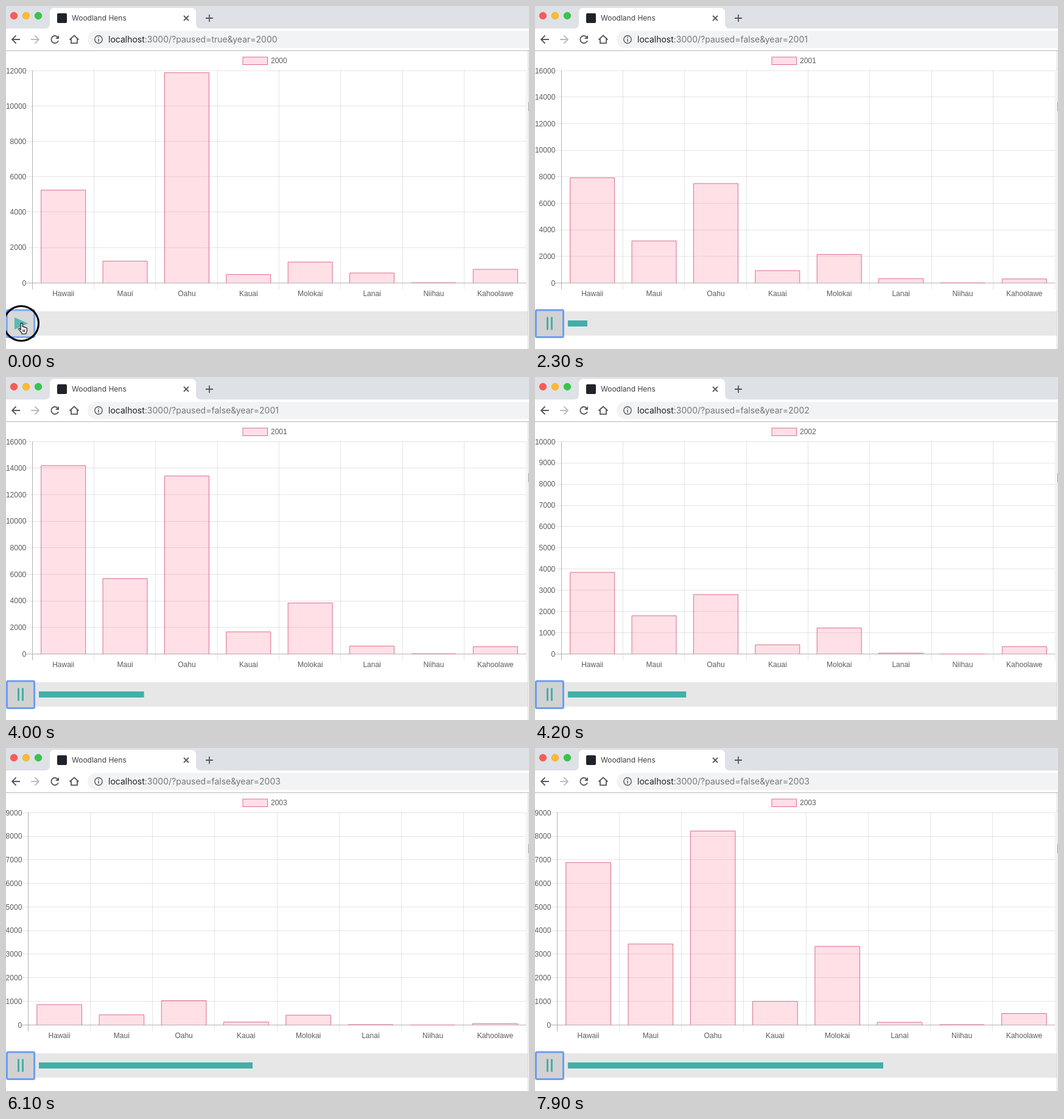
These frames come from a looping animation (859 px wide and 564 px high, 8000 ms). An HTML page:

```html
<!DOCTYPE html>
<html lang="en">
<head>
<meta charset="utf-8">
<title>Woodland Hens</title>
<style>
  html, body { margin: 0; width: 100%; height: 100%; overflow: hidden; background: #fff; }
  svg { display: block; }
  .ui { font-family: Inter, Roboto, sans-serif; }
  #chart { font: 12px "Liberation Sans", Arial, sans-serif; fill: #5c5c5c; }
  .icon { fill: none; stroke: #55585c; stroke-width: 1.8; }
  .grid { fill: none; stroke: #000; stroke-opacity: .1; }
  .axis { fill: none; stroke: #b2b2b2; }
  .bar { fill: #ff6384; fill-opacity: .2; stroke: #db6c8d; }
</style>
</head>
<body>
<svg width="859" height="564" viewBox="0 0 859 564">
  <rect width="859" height="564" fill="#fff"/>

  <g class="ui">
    <rect width="859" height="37" fill="#dee1e6"/>
    <path d="M64 37q8 0 8-8V11q0-8 8-8h224q8 0 8 8v18q0 8 8 8z" fill="#fff"/>
    <g stroke-width=".6">
      <circle cx="13" cy="16" r="5.8" fill="#fc5b57" stroke="#df4744"/>
      <circle cx="33" cy="16" r="5.8" fill="#fdbc2e" stroke="#de9f28"/>
      <circle cx="53" cy="16" r="5.8" fill="#34c748" stroke="#27aa35"/>
    </g>
    <rect x="84" y="12" width="16" height="16" rx="2" fill="#20232a"/>
    <text x="108" y="24" font-size="12" fill="#3c4043">Woodland Hens</text>
    <path class="icon" d="M292 16l8 8m0-8l-8 8M328 20h12M334 14v12"/>
    <g class="icon">
      <path d="M23 55H10m6.5-6.5L10 55l6.5 6.5"/>
      <path d="M41 55h13m-6.5-6.5L54 55l-6.5 6.5" stroke="#b9bbbe"/>
      <path d="M85 51.2A6 6 0 1 0 86 57"/>
      <path d="M87 48v6h-6z" fill="#55585c" stroke="none"/>
      <path d="M104.5 55.5L112 48.5l7.5 7M107 54v7.2h10V54"/>
    </g>
    <path d="M859 41H148a14 14 0 0 0 0 28h711z" fill="#f1f3f4"/>
    <circle class="icon" cx="152" cy="55" r="6.2" style="stroke-width:1.4"/>
    <path class="icon" d="M152 54v4.5M152 51v1.6" style="stroke-width:1.5"/>
    <text x="168" y="60" font-size="14" fill="#74777b"><tspan fill="#202124">localhost</tspan><tspan id="query"></tspan></text>
    <path d="M0 73.5h859" stroke="#b6b6b6"/>
  </g>

  <g id="chart"></g>

  <rect y="502" width="857" height="40" fill="#e7e7e7"/>
  <path d="M857.5 74v490M857 103.5h2" stroke="#d2d2d2"/>
  <rect x="858" y="158" width="1" height="15" fill="#bdbdbd"/>
  <rect id="progress" x="54" y="517" height="10" fill="#42afa9"/>

  <rect x="1.5" y="500" width="45" height="44.5" rx="2" fill="#d2d2d2" stroke="#6b9ef5" stroke-width="3"/>
  <path id="play" d="M14 512v20l22-10z" fill="#42afa9"/>
  <path id="pause" d="M19 511.5h3v21h-3zM26 511.5h3v21h-3z" fill="#42afa9"/>
  <g id="ring">
    <circle cx="25" cy="522" r="28.5" fill="#fff" fill-opacity=".12" stroke="#000" stroke-width="3"/>
  </g>
  <path id="hand" d="M24.2 532.5V523q0-1.6 1.5-1.6t1.5 1.6v4.6q2.4-.8 2.7.7 2.3-.6 2.5.8 2-.4 2 1.4v3.5q0 2-1.6 3.8v1.4h-6.6v-1.4L21 532q-.7-1.5.7-2 1-.3 2.5 2.5zM28 532v4m2.3-4v4"
        fill="#fff" stroke="#000" stroke-width="1.1" stroke-linejoin="round"/>
</svg>

<script>
const DURATION = 8000, FRAME = 100, ANIMATION = 1000, CLICK = 200;
const TOP = 106, BOTTOM = 455, RIGHT = 854, YEAR_WIDTH = 518 / 3;
const islands = ['Hawaii', 'Maui', 'Oahu', 'Kauai', 'Molokai', 'Lanai', 'Niihau', 'Kahoolawe'];
const years = [
  { start: -ANIMATION, max: 12000, step: 2000, left: 43, values: [5253, 1236, 11890, 481, 1185, 567, 12, 773] },
  { start: 2115, max: 16000, step: 2000, left: 43, values: [14200, 5680, 13420, 1671, 3848, 596, 18, 549] },
  { start: 4075, max: 10000, step: 1000, left: 43, values: [9299, 4349, 6767, 1044, 2961, 100, 3, 844] },
  { start: 6067, max: 9000, step: 1000, left: 36, values: [6888, 3437, 8227, 1004, 3335, 116, 13, 489] }
];

const byId = id => document.getElementById(id);
const clamp = x => Math.max(0, Math.min(1, x));
const easeOutQuart = p => 1 - (1 - p) ** 4;
const show = (id, visible) => byId(id).setAttribute('visibility', visible ? 'visible' : 'hidden');
const label = (x, y, anchor, text) => `<text x="${x}" y="${y}" text-anchor="${anchor}">${text}</text>`;

function chartMarkup({ max, step, left, values }, year, growth) {
  const cell = (RIGHT - left) / islands.length;
  const barWidth = cell * 0.72;
  let grid = '', bars = '', labels = '';

  for (let value = 0; value <= max; value += step) {
    const y = BOTTOM - (BOTTOM - TOP) * value / max;
    if (value) grid += `M${left - 10} ${Math.floor(y + 0.3) + 0.5}H${RIGHT}`;
    labels += label(left - 9.7, y + 4.5, 'end', value);
  }
  islands.forEach((name, i) => {
    const center = left + 0.5 + cell * (i + 0.5);
    const x = center - barWidth / 2;
    const y = BOTTOM + 0.5 - (BOTTOM - TOP) * growth * values[i] / max;
    grid += `M${Math.floor(left + cell * (i + 1)) + 0.5} ${TOP}V466`;
    bars += `<path class="bar" d="M${x} ${BOTTOM + 0.5}V${y}h${barWidth}V${BOTTOM + 0.5}"/>`;
    labels += label(center, 477, 'middle', name);
  });

  return `<path class="grid" d="${grid}"/>
    <path class="axis" d="M${left + 0.5} ${TOP}V466M${left - 10} ${BOTTOM + 0.5}H${RIGHT}"/>
    ${bars}${labels}
    <rect class="bar" x="389" y="84" width="40.5" height="12.5"/>
    ${label(435, 94, 'start', year)}`;
}

function render(time) {
  const index = years.findLastIndex(({ start }) => time >= start);
  const data = years[index];
  const progress = clamp((time - data.start) / ANIMATION);
  const year = 2000 + index;
  const paused = time < CLICK;

  byId('chart').innerHTML = chartMarkup(data, year, easeOutQuart(progress));
  byId('query').textContent = `:3000/?paused=${paused}&year=${year}`;
  byId('progress').setAttribute('width', index ? (index - 1 + progress) * YEAR_WIDTH : 0);

  show('play', paused);
  show('pause', !paused);
  byId('ring').setAttribute('opacity', 1 - clamp((time - 100) / 300));
  const away = clamp((time - 300) / 1000) ** 2;
  byId('hand').setAttribute('transform', `translate(${30 * away} ${46 * away})`);
  show('hand', time < 1300);
}

function tick() {
  const time = performance.now() % DURATION;
  render(Math.floor(time / FRAME) * FRAME);
  requestAnimationFrame(tick);
}
tick();
</script>
</body>
</html>
```
